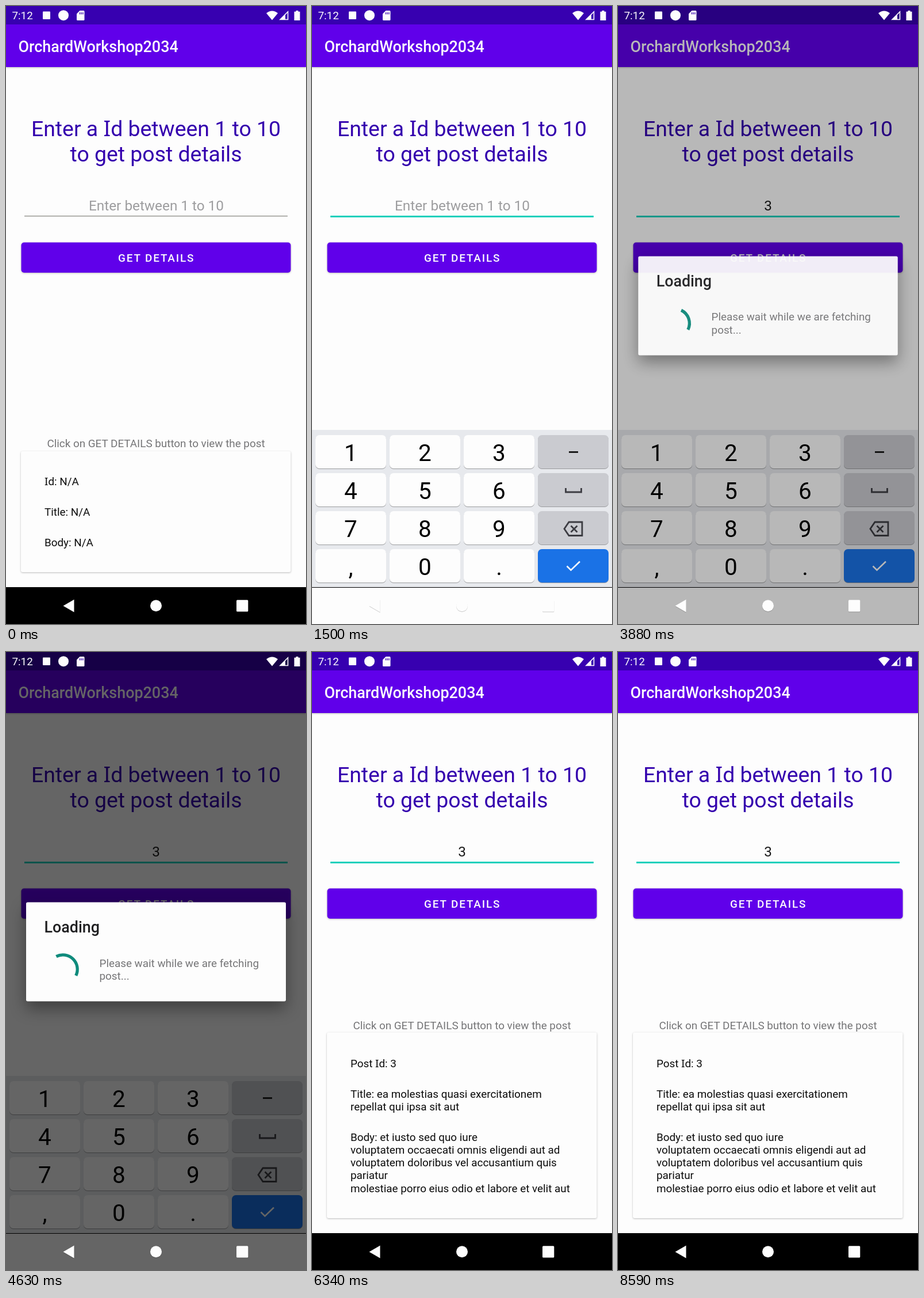
Animation of 522 by 1073 pixels, one loop 8.63 s. Source, as an HTML page:

```html
<!DOCTYPE html>
<html lang="en">
<head>
<meta charset="utf-8">
<title>Post details</title>
<style>
  html, body { margin: 0; width: 100%; height: 100%; overflow: hidden; background: #fdfdfd; }
  svg { display: block; width: 100%; height: 100%; font-family: Roboto, sans-serif; }
  .i { font-family: "Noto Sans", sans-serif; }
  .medium { font-weight: 500; }
  .mid { text-anchor: middle; }
  .card { filter: drop-shadow(0 1px 1.5px #0004); }
  .key { filter: drop-shadow(0 1px 0.5px #0005); }
  .panel { filter: drop-shadow(0 12px 14px #0006); }
  .nav { filter: drop-shadow(0 1px 0.7px #0003); }
</style>
</head>
<body>
<svg id="stage" viewBox="0 0 522 1073"></svg>
<script>
const LOOP = 8630;
const FOCUS = 800, TYPED = 2200, ASK = 3790, ANSWER = 4750, REFOCUS = 4800, CLOSE = 5450;
const TEAL = '#14d0bc', WHITE = '#fdfdfd';

const text = (x, y, size, str, fill = '#0c0c0c', cls = '', more = '') =>
  `<text x="${x}" y="${y}" font-size="${size}" fill="${fill}" class="${cls}" ${more}>${
    str.replace('Id', '<tspan class="i">I</tspan>d')}</text>`;
const rect = (x, y, w, h, fill, rx = 0, more = '') =>
  `<rect x="${x}" y="${y}" width="${w}" height="${h}" fill="${fill}" rx="${rx}" ${more}/>`;
const path = (d, fill, more = '') => `<path d="${d}" fill="${fill}" ${more}/>`;
const lines = (rows) => rows.map(([y, str]) => text(67, y, 18.85, str)).join('');

const before = rect(26, 773, 469.5, 210, WHITE, 3, 'class="card"') +
  lines([[832, 'Id: N/A'], [884.5, 'Title: N/A'], [937.5, 'Body: N/A']]);

const after = rect(26, 660.5, 469.5, 322.5, WHITE, 3, 'class="card"') + lines([
  [720.5, 'Post Id: 3'],
  [773.5, 'Title: ea molestias quasi exercitationem'],
  [795.5, 'repellat qui ipsa sit aut'],
  [848.5, 'Body: et iusto sed quo iure'],
  [870.5, 'voluptatem occaecati omnis eligendi aut ad'],
  [893, 'voluptatem doloribus vel accusantium quis'],
  [915, 'pariatur'],
  [937.5, 'molestiae porro eius odio et labore et velit aut']]);

const page =
  rect(0, 32, 522, 74, '#6000ea', 0, 'class="card"') +
  rect(0, 0, 522, 32, '#3700b0') +
  text(21.5, 79.5, 26.9, 'OrchardWorkshop2034', WHITE, 'medium') +
  text(261, 226, 37.4, 'Enter a Id between 1 to 10', '#3400ae', 'mid') +
  text(261, 269.5, 37.4, 'to get post details', '#3400ae', 'mid') +
  text(261.5, 355, 24.3, 'Enter between 1 to 10', '#9d9d9f', 'mid', 'id="hint"') +
  text(261, 355, 24.3, '3', '#1c1c1c', 'mid', 'id="value"') +
  rect(32, 364, 458, 1.4, '#92928c', 0, 'id="line"') +
  rect(0, 329, 2.8, 32.5, TEAL, 0, 'id="cursor"') +
  rect(26.5, 410.5, 469, 52.5, '#6000ea', 5, 'class="card"') +
  text(195, 444.3, 18.9, 'GET DETAILS', WHITE, 'medium', 'letter-spacing="1.9"') +
  text(261, 766, 18.85, 'Click on GET DETAILS button to view the post', '#757577', 'mid', 'id="note"') +
  `<g id="before">${before}</g><g id="after">${after}</g>`;

const labels = ['123', '456', '789', ',0.'];
const keys = labels.map((row, r) => [0, 1, 2, 3].map(c => {
  const x = 6 + 129 * c, y = 745 + 66 * r;
  const fill = c < 3 ? WHITE : r < 3 ? '#cacbd0' : '#1a72e6';
  return rect(x, y, 123, 58, fill, 7, 'class="key"') +
    (c < 3 ? text(x + 61.5, y + 44.5, 40.5, row[c], '#000', 'mid') : '');
}).join('')).join('');
const stroke = (color, w = 2.8) => `stroke="${color}" stroke-width="${w}"`;
const keyboard = rect(0, 736, 522, 340, '#e7e9ed', 0, 'class="key"') + keys +
  path('M447 774.5H463', 'none', stroke('#111')) +
  path('M441.5 837V844H468.5V837', 'none', stroke('#3c3c42')) +
  path('M447 896H470V919.5H447L439 907.7Z', 'none', stroke('#3c3c42')) +
  path('M450.5 902.5L461.5 913.5M461.5 902.5L450.5 913.5', 'none', stroke('#3c3c42')) +
  path('M443.5 972.5L450.5 979.5L466 964.5', 'none', stroke(WHITE, 2.6));

const statusIcons =
  text(10.5, 23.3, 18.8, '7:12', WHITE) +
  rect(64, 9.5, 13, 13.5, WHITE, 1) +
  `<circle cx="100" cy="16.2" r="9" fill="${WHITE}"/>` +
  path('M128.5 8H135Q136.5 8 136.5 9.5V23.5Q136.5 25 135 25H124.5Q123 25 123 23.5V13.5Z', WHITE) +
  path('M128.5 11V14.5M131.2 11V14.5M133.9 11V14.5', 'none', stroke('#3700b0', 1.3)) +
  path('M453 12.5Q463 4.5 473 12.5L463 24.5Z', WHITE) +
  path('M477 23.5L490.5 10V23.5Z', 'none', stroke(WHITE, 1.6)) +
  path('M476 24L486 14V24Z', WHITE) +
  path('M504.5 8H508.5V9.8H511.5V25H501.5V9.8H504.5Z', WHITE);

const navIcons = `<g class="nav">` +
  path('M99.5 1041.5L118.5 1030.5V1052.5Z', WHITE) +
  `<circle cx="261" cy="1041.3" r="10" fill="${WHITE}"/>` +
  rect(401, 1031.3, 20.3, 20.3, WHITE, 1.5) + '</g>';

const dialog =
  rect(35, 434.5, 452, 172, WHITE, 2.7, 'class="panel"') +
  text(66.5, 487, 26.8, 'Loading', '#202022', 'medium') +
  path('', 'none', 'id="arc" stroke="#0f8b7c" stroke-width="5.3"') +
  text(162.5, 546.5, 18.85, 'Please wait while we are fetching', '#757577') +
  text(162.5, 569, 18.85, 'post...', '#757577');

document.getElementById('stage').innerHTML = page +
  `<g id="keyboard">${keyboard}</g>` +
  rect(0, 1009, 522, 64, '#000') +
  rect(0, 1010, 522, 63, WHITE, 0, 'id="lightNav"') +
  rect(0, 0, 522, 1073, '#000', 0, 'id="dim"') +
  `<g id="dialog">${dialog}</g>` + statusIcons + navIcons;

const el = id => document.getElementById(id);
const set = (id, attrs) => { for (const k in attrs) el(id).setAttribute(k, attrs[k]); };
const show = (id, on) => set(id, { display: on ? 'inline' : 'none' });
const ramp = (t, start, ms) => Math.min(1, Math.max(0, (t - start) / ms));
const easeOut = (u, n) => 1 - (1 - u) ** n;

function cursorOn(t) {
  if (t < FOCUS || (t >= ASK && t < REFOCUS)) return false;
  const start = t < TYPED ? FOCUS : t < ASK ? TYPED : REFOCUS;
  return (t - start) % 1000 < 500;
}

function arcPath(ms) {
  const half = 666, u = ms % (2 * half);
  const spin = ms * 0.2295 + Math.floor(ms / (2 * half)) * 270;
  const head = spin + 8 + 270 * easeOut(ramp(u, 0, half), 2);
  const tail = spin + 270 * easeOut(ramp(u, half, half), 2);
  const at = deg => {
    const a = deg * Math.PI / 180;
    return `${99 + 25.2 * Math.sin(a)} ${551 - 25.2 * Math.cos(a)}`;
  };
  return `M${at(tail)}A25.2 25.2 0 ${head - tail > 180 ? 1 : 0} 1 ${at(head)}`;
}

function draw(t) {
  const focused = t >= FOCUS, typed = t >= TYPED, answered = t >= ANSWER;

  show('hint', !typed);
  show('value', typed);
  set('line', { height: focused ? 3 : 1.4, fill: focused ? TEAL : '#92928c' });
  set('cursor', { x: typed ? 267.4 : 260 });
  show('cursor', cursorOn(t));
  show('before', !answered);
  show('after', answered);
  set('note', { y: answered ? 654.7 : 766 });

  const up = easeOut(ramp(t, FOCUS + 60, 280), 3) - ramp(t, CLOSE, 220) ** 2;
  set('keyboard', { transform: `translate(0 ${340 * (1 - up)})` });
  show('keyboard', up > 0);
  set('lightNav', { opacity: ramp(t, FOCUS + 60, 200) - ramp(t, CLOSE, 200) });

  const enter = ramp(t, ASK, 150), leave = ramp(t, ANSWER, 150);
  const scale = 0.9 + 0.1 * easeOut(enter, 5);
  set('dim', { opacity: 0.6 * (ramp(t, ASK, 200) - ramp(t, ANSWER, 200)) });
  set('dialog', {
    opacity: easeOut(enter, 3) - easeOut(leave, 3),
    transform: `translate(261 520.5) scale(${scale}) translate(-261 -520.5)`
  });
  show('dialog', enter > 0 && leave < 1);
  set('arc', { d: arcPath(Math.max(0, t - ASK + 20)) });
}

const began = performance.now();
function tick() {
  draw((performance.now() - began) % LOOP);
  requestAnimationFrame(tick);
}
tick();
</script>
</body>
</html>
```
